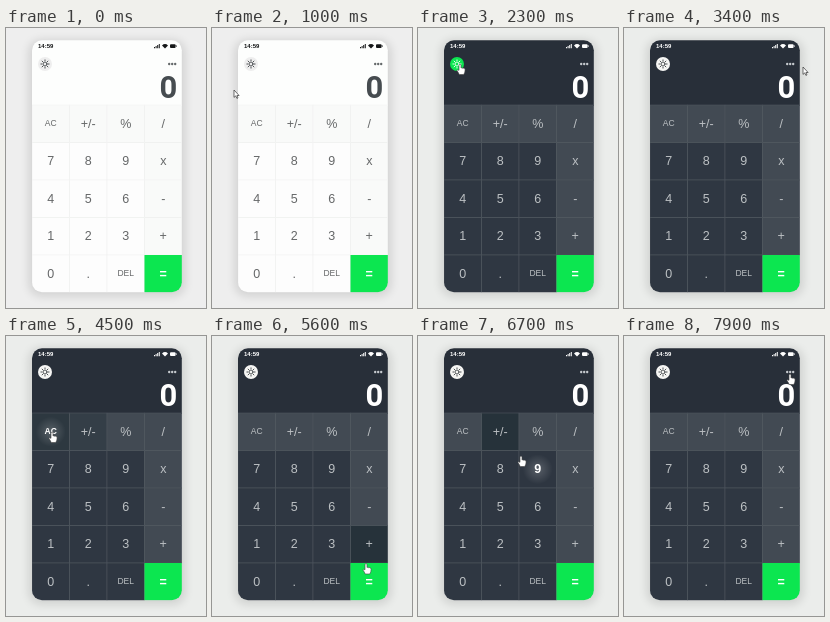
These frames come from a looping animation (200x280 px, 8 s). An HTML page:

```html
<!DOCTYPE html>
<html lang="en">
<head>
<meta charset="utf-8">
<title>Calculator</title>
<style>
  html, body { margin: 0; width: 100%; height: 100%; overflow: hidden; background: #ececeb; }
  svg { display: block; width: 100vw; height: 100vh; }
  text { font-family: "Liberation Sans", Arial, sans-serif; }
  #value { font-family: Roboto, Arial, sans-serif; }
</style>
</head>
<body>
<svg id="stage" viewBox="0 0 200 280">
  <defs>
    <clipPath id="body"><rect x="26" y="12.2" width="149.8" height="252" rx="10"/></clipPath>
    <filter id="soft" x="-20%" y="-20%" width="140%" height="140%"><feGaussianBlur stdDeviation="5"/></filter>
    <radialGradient id="halo">
      <stop offset="0" stop-color="#fff" stop-opacity=".2"/>
      <stop offset="1" stop-color="#fff" stop-opacity="0"/>
    </radialGradient>
  </defs>
  <rect id="backdrop" width="200" height="280"/>
  <rect x="23" y="12" width="156" height="256" rx="12" fill="#000" opacity=".12" filter="url(#soft)"/>
  <g clip-path="url(#body)">
    <rect id="screen" x="26" y="12" width="150" height="66"/>
    <g id="keys"></g>
  </g>
  <g id="status">
    <text x="32" y="20.3" font-size="6" font-weight="700">14:59</text>
    <path d="M148 20.3v-1.2h1v1.2zM149.6 20.3v-2.2h1v2.2zM151.2 20.3v-3.2h1v3.2zM152.8 20.3v-4.4h1v4.4z"/>
    <path d="M156 17.4q3-2.6 6 0l-3 3.2z"/>
    <rect x="164" y="16.2" width="5.6" height="3.8" rx="1"/>
    <rect x="170" y="17.3" width=".6" height="1.6"/>
  </g>
  <g id="dots">
    <circle cx="163.2" cy="36" r="1.2"/><circle cx="166.2" cy="36" r="1.2"/><circle cx="169.2" cy="36" r="1.2"/>
  </g>
  <circle id="toggle" cx="39" cy="36" r="7"/>
  <g id="sun" fill="none" stroke-width=".9" stroke-linecap="round"><circle cx="39" cy="36" r="2"/></g>
  <text id="value" x="162.3" y="70" font-size="31" font-weight="700" text-anchor="middle">0</text>
  <path id="arrow" d="M0 0V7.4L1.7 5.9L2.9 8.4L4 7.9L2.9 5.5H5.1Z" fill="#fff" stroke="#333" stroke-width=".7" stroke-linejoin="round"/>
  <path id="hand" d="M-1 .8Q0-.8 1 .8V4Q2 3.3 2.6 4.2Q3.5 3.6 4 4.6Q5.2 4.3 5.1 5.8Q5.2 8.3 3.8 10.5H-.8Q-1.5 8.7-3 6.6Q-3.3 5.2-1 6.3Z" fill="#fff" stroke="#444" stroke-width=".6" stroke-linejoin="round"/>
</svg>
<script>
const DURATION = 8000, STEP = 100, CELL = 37.5, LEFT = 26, TOP = 77;
const GREEN = '#0ce650';
const $ = id => document.getElementById(id);

function add(parent, tag, attrs) {
  const node = document.createElementNS('http://www.w3.org/2000/svg', tag);
  for (const name in attrs) node.setAttribute(name, attrs[name]);
  return parent.appendChild(node);
}
const set = (node, name, value) => node.setAttribute(name, value);
const clamp = v => Math.max(0, Math.min(1, v));

function mix(from, to, k) {
  const part = (hex, i) => parseInt(hex.slice(i, i + 2), 16);
  return 'rgb(' + [1, 3, 5].map(i => Math.round(part(from, i) + (part(to, i) - part(from, i)) * k)) + ')';
}

// Pointer stops: time, x, y
const route = [
  [200, 21, 140], [1000, 22, 62], [1600, 42, 36], [2900, 42, 36],
  [3400, 179, 39], [3700, 183, 58], [3900, 171, 88], [4200, 92, 97], [4360, 63, 97], [4500, 46, 96],
  [4700, 70, 97], [5000, 150, 97], [5300, 156, 190], [5500, 155, 216], [5600, 154, 227.5],
  [5700, 140, 245], [6000, 44, 246], [6300, 45, 118], [6400, 72, 96], [6600, 92, 101],
  [6700, 103, 120], [7000, 119, 208], [7250, 82, 205], [7400, 84, 163], [7600, 140, 100],
  [7700, 156, 66], [7900, 166, 38]
];

function pointer(t) {
  if (t < route[0][0]) return null;
  const next = route.findIndex(stop => stop[0] > t);
  if (next < 0) return route[route.length - 1].slice(1);
  const a = route[next - 1], b = route[next], k = (t - a[0]) / (b[0] - a[0]);
  return [a[1] + (b[1] - a[1]) * k, a[2] + (b[2] - a[2]) * k];
}

function keyAt(p) {
  if (!p) return -1;
  const col = Math.floor((p[0] - LEFT) / CELL), row = Math.floor((p[1] - TOP) / CELL);
  return col >= 0 && col < 4 && row >= 0 && row < 5 ? row * 4 + col : -1;
}
const near = (p, x, y, r) => p && Math.hypot(p[0] - x, p[1] - y) < r;

const labels = 'AC +/- % / 7 8 9 x 4 5 6 - 1 2 3 + 0 . DEL ='.split(' ');
const keys = labels.map((label, i) => {
  const col = i % 4, row = Math.floor(i / 4);
  const x = LEFT + col * CELL, y = TOP + row * CELL, cx = x + CELL / 2, cy = y + CELL / 2;
  const word = /[A-Z]{2}/.test(label), equals = label === '=';
  const cell = add($('keys'), 'rect', { x, y, width: CELL, height: CELL, 'stroke-width': equals ? 0 : .6 });
  const halo = add($('keys'), 'circle', { cx, cy, r: 15, fill: 'url(#halo)' });
  const text = add($('keys'), 'text', {
    x: cx, y: cy + (word ? 2.5 : 4), 'font-size': word ? 8.5 : 12.5, 'text-anchor': 'middle'
  });
  text.textContent = label;
  return { cell, halo, text, equals, operator: row === 0 || col === 3 };
});

for (let i = 0; i < 8; i++)
  add($('sun'), 'path', { d: 'M39 32.7v-.8', transform: `rotate(${i * 45} 39 36)` });

// Share of the last quarter second the pointer spent on a key
function dwell(t, index) {
  let hits = 0;
  for (let age = 0; age < 250; age += 25) hits += keyAt(pointer(t - age)) === index;
  return clamp(hits / 8);
}

function render(t) {
  const dark = clamp((t - 2100) / 200), p = pointer(t), active = keyAt(p);
  const theme = (light, night) => mix(light, night, dark);
  set($('backdrop'), 'fill', theme('#eeeeee', '#ebedeb'));
  set($('screen'), 'fill', theme('#fdfefd', '#282f39'));
  set($('status'), 'fill', theme('#151718', '#ffffff'));
  set($('dots'), 'fill', theme('#65696b', '#c5c9ce'));
  set($('value'), 'fill', theme('#464c50', '#ffffff'));

  const overToggle = near(p, 39, 36, 7.5);
  set($('toggle'), 'fill', overToggle ? GREEN : theme('#eeeeee', '#f6f6f4'));
  set($('sun'), 'stroke', overToggle ? '#fff' : '#3b4043');

  keys.forEach((key, i) => {
    const on = i === active;
    const [light, night] = key.operator ? ['#f9faf9', '#424a53'] : ['#fdfdfd', '#2f3742'];
    const base = theme(light, night);
    const hovered = mix(dark < 1 ? light : night, dark < 1 ? '#eeeeee' : '#26323a', dwell(t, i));
    set(key.cell, 'fill', key.equals ? GREEN : dwell(t, i) ? hovered : base);
    set(key.cell, 'stroke', theme('#f1f2f1', '#4d555d'));
    set(key.halo, 'opacity', on && !key.equals ? 1 : 0);
    set(key.text, 'fill', key.equals || on ? '#fff' : theme('#666869', '#bcc0c3'));
    set(key.text, 'font-weight', key.equals || on ? 700 : 400);
  });

  const pressable = active >= 0 || overToggle || near(p, 166, 36, 5);
  for (const [id, shown] of [['arrow', p && !pressable], ['hand', p && pressable]]) {
    set($(id), 'visibility', shown ? 'visible' : 'hidden');
    if (shown) set($(id), 'transform', `translate(${p})`);
  }
}

const start = performance.now();
function tick() {
  const t = (performance.now() - start) % DURATION;
  render(Math.floor(t / STEP) * STEP);
  requestAnimationFrame(tick);
}
tick();
</script>
</body>
</html>
```
